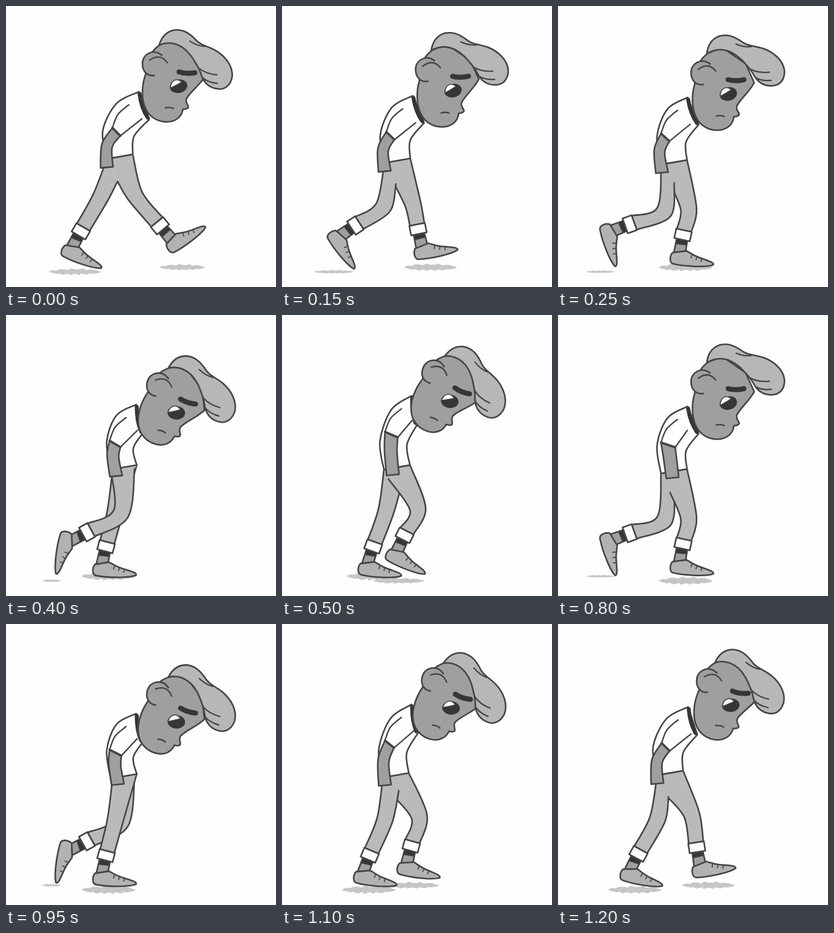
These frames come from a looping animation (477x498 px, 1.25 s). An HTML page:

```html
<!DOCTYPE html>
<html lang="en">
<head>
<meta charset="utf-8">
<title>Gloomy walk</title>
<style>
html, body { margin: 0; width: 100%; height: 100%; overflow: hidden; background: #fefefe; }
svg { display: block; width: 100vw; height: 100vh; }
path { stroke-linecap: round; stroke-linejoin: round; }
</style>
</head>
<body>
<svg id="stage" viewBox="0 0 477 498"></svg>
<script>
const LOOP = 1250, FRAME = 50, STEP = 550, FIRST = 700;
const INK = '#454545', DARK = '#363636', SKIN = '#9f9f9f', HAIR = '#b7b7b7',
      PANTS = '#bababa', SHOE = '#b2b2b2', SHADE = '#c6c6c6', WHITE = '#fefefe';

// Key poses of one leg, shared by both: phase (0 = heel strike), heel x y, foot pitch, knee x y
const LEG = [
  [0, 295, 437, -38, 228, 336],
  [.09, 202, 456, 2, 231, 360],
  [.227, 157, 461, 0, 193, 348],
  [.455, 112, 453, 9, 176, 345],
  [.5, 99, 442, 18, 167, 339],
  [.59, 74, 394, 68, 187, 365],
  [.727, 97, 386, 97, 203, 352],
  [.818, 184, 433, 21, 240, 344],
  [.955, 243, 449, -13, 236, 337]
];
// Upper body through one step: phase, collar x y, hip x y, ear x y, head tilt, hair lag
const BODY = [
  [0, 235, 152, 201, 267, 260, 102, 1, 0],
  [.18, 229, 162, 205, 277, 254, 118, -2, -8],
  [.45, 230, 159, 208, 270, 268, 123, 16, -5],
  [.64, 229, 143, 203, 270, 267, 100, 20, 0],
  [.91, 230, 147, 198, 264, 264, 100, 6, 2]
];

// Smooth cyclic interpolation, phase 0..1
function pose(keys, phase) {
  const n = keys.length;
  const row = i => keys[(i + n) % n];
  const at = i => row(i)[0] + Math.floor(i / n);
  let i = n - 1;
  while (keys[i][0] > phase) i--;
  const h = at(i + 1) - at(i), s = (phase - at(i)) / h;
  const [p, a, b, q] = [i - 1, i, i + 1, i + 2].map(row);
  return a.slice(1).map((v, j) => {
    const k = j + 1, d = b[k] - v;
    const ma = (b[k] - p[k]) / (at(i + 1) - at(i - 1)) * h;
    const mb = (q[k] - v) / (at(i + 2) - at(i)) * h;
    return v + s * (ma + s * (3 * d - 2 * ma - mb + s * (ma + mb - 2 * d)));
  });
}

const off = (p, x, y) => [p[0] + x, p[1] + y];
const along = (p, d, k) => [p[0] + d[0] * k, p[1] + d[1] * k];
const mix = (a, b, s) => [a[0] + (b[0] - a[0]) * s, a[1] + (b[1] - a[1]) * s];
const dir = (a, b) => {
  const len = Math.hypot(b[0] - a[0], b[1] - a[1]);
  return [(b[0] - a[0]) / len, (b[1] - a[1]) / len];
};
const polar = deg => [Math.cos(deg * Math.PI / 180), Math.sin(deg * Math.PI / 180)];
const ahead = d => [d[1], -d[0]];
const str = p => p[0].toFixed(1) + ' ' + p[1].toFixed(1);
const poly = pts => 'M' + pts.map(str).join('L');

// Smooth path through points
function curve(pts, closed, start = 'M') {
  const n = pts.length;
  const at = i => closed ? pts[(i + n) % n] : pts[Math.max(0, Math.min(n - 1, i))];
  let d = start + str(pts[0]);
  for (let i = 0; i < (closed ? n : n - 1); i++) {
    const a = at(i), b = at(i + 1), p = at(i - 1), q = at(i + 2);
    const c1 = off(a, (b[0] - p[0]) / 6, (b[1] - p[1]) / 6);
    const c2 = off(b, (a[0] - q[0]) / 6, (a[1] - q[1]) / 6);
    d += 'C' + [c1, c2, b].map(str).join(' ');
  }
  return closed ? d + 'Z' : d;
}
// Limb outline, open at its top: down the back, up the front
const limb = (back, front) => curve(back) + curve(front.reverse(), false, 'L');

const stage = document.getElementById('stage');
function add(tag, attrs, parent = stage) {
  const el = document.createElementNS('http://www.w3.org/2000/svg', tag);
  for (const k in attrs) el.setAttribute(k, attrs[k]);
  return parent.appendChild(el);
}
const shape = (fill, width = 2.8, parent = stage, d = '', stroke = INK) =>
  add('path', { d, fill, stroke: width ? stroke : 'none', 'stroke-width': width }, parent);
const draw = (el, d) => el.setAttribute('d', d);

const makeLeg = () => ({
  sock: shape(SKIN), band: shape(DARK, 1.5), foot: shape(SHOE), laces: shape('none', 1.8),
  pants: shape(PANTS), hem: shape(WHITE)
});
const shade = shape(SHADE, 0);
const far = makeLeg();
const pelvis = shape(PANTS, 0);
const near = makeLeg();
const shirt = shape(WHITE);
const arm = shape(SKIN);
const sleeve = shape(WHITE, 2.5);
const cuff = shape('none', 4);
const collar = shape('none', 7, stage, '', DARK);

// Head, drawn upright around the ear at 262 103
const head = add('g', {});
shape(SKIN, 2.8, head, 'M276 68C258 78 248 100 249 122C243 140 241 165 250 183C257 198 272 206 287 206' +
  'C303 206 314 197 316 183C322 183 327 181 325 177C322 172 320 168 322 164C330 150 345 140 354 124L340 90L300 60Z');
shape(SKIN, 0, head, 'M277 88C262 76 243 86 243 103C243 117 252 126 264 124L284 108Z');
shape('none', 2.8, head, 'M277 88C262 76 243 86 243 103C243 117 252 126 264 124');
shape('none', 2.5, head, 'M256 97Q274 84 287 101');
add('ellipse', { cx: 307.5, cy: 142.5, rx: 15.5, ry: 12, fill: DARK, transform: 'rotate(-12 307 142)' }, head);
shape(WHITE, 1.6, head, 'M293 146Q294 133 303 131Q309 131 313 135Q305 140 293 146Z');
shape('none', 9, head, 'M308 117Q321 121 336 118', DARK);
shape('none', 2.6, head, 'M285 181Q293 179 299 182');
const hair = add('g', {}, head);
shape(HAIR, 2.8, hair, 'M272 70C276 56 284 46 298 43C314 41 324 48 334 57C345 70 358 70 372 78' +
  'C388 87 403 104 402 123C400 138 391 146 380 146C368 146 358 141 351 130C347 122 346 116 342 109' +
  'C334 96 328 84 314 74C300 65 286 64 272 70Z');
shape('none', 2.4, hair, 'M343 110Q356 120 375 121M350 127Q360 135 376 136M326 62Q338 70 352 71');

// Returns the shoe's left and right end and its lift
function drawLeg(leg, phase, [left, right, crotch]) {
  const [hx, hy, pitch, kx, ky] = pose(LEG, phase);
  const heel = [hx, hy], knee = [kx, ky], sole = polar(pitch), up = ahead(sole);
  const at = (x, y) => along(along(heel, sole, x), up, y);
  const bez = (...p) => 'C' + p.map(q => str(at(...q))).join(' ');
  draw(leg.foot, 'M' + str(at(0, 19)) + bez([-5, 12], [-5, 0], [3, -1]) +
    bez([25, -5], [62, -5], [73, 0]) + bez([75, 5], [59, 8], [48, 12]) +
    bez([38, 15], [31, 20], [25, 23]) + 'Z');
  draw(leg.laces, [0, 1, 2].map(i =>
    poly([at(35 + 9 * i, 17 - 3 * i), at(33 + 9 * i, 11 - 3 * i)])).join(''));

  // trousers hang between the hip, the knee and a hem above the ankle
  const swing = Math.cos(2 * Math.PI * phase);
  const back = mix(left, crotch, Math.max(0, swing));
  const front = mix(right, crotch, Math.max(0, -swing));
  const ankle = at(12, 20), shin = dir(ankle, knee), hem = along(ankle, shin, 40);
  const kneeSide = ahead(dir(mix(back, front, .5), hem)), side = ahead(dir(knee, ankle));
  draw(leg.pants, limb(
    [back, along(knee, kneeSide, -14), along(hem, side, -13)],
    [front, along(knee, kneeSide, 14), along(hem, side, 13)]));
  const row = (k, w) => [-w, w].map(s => along(along(hem, shin, -k), side, s));
  const [a, b] = row(0, 14), [c, d] = row(17, 14);
  draw(leg.hem, poly([a, b, d, c]) + 'Z');
  const [e, f] = row(17, 9.5), g = at(2, 17), h = at(23, 20);
  draw(leg.sock, poly([e, g, h, f]) + 'Z');
  draw(leg.band, poly([e, mix(e, g, .35), mix(f, h, .35), f]) + 'Z');
  const toe = at(73, 0);
  return [Math.min(hx, toe[0]), Math.max(hx, toe[0]), 460 - hy];
}

// Ragged flat streak under a foot; thinner when the foot is up
function streak([l, r, lift], y) {
  const top = [], low = [], n = 14, half = Math.max(5, Math.min(15, 15 - lift / 6)) / 2;
  l -= 24;
  for (let i = 0; i <= n; i++) {
    const s = i / n, x = l + (r - l) * s, k = half * Math.sqrt(Math.sin(Math.PI * s) + 1e-6);
    top.push([x, y - k * (.8 + .25 * Math.sin(i * 2.3))]);
    low.unshift([x + 3 * Math.sin(i * 4), y + k * (.8 + .3 * Math.sin(i * 3.1 + 1))]);
  }
  return poly(top.concat(low)) + 'Z';
}

function drawTorso(neck, waist, throat, sway) {
  const [left, right] = waist;
  const ribs = off(left, -7, -50);
  draw(shirt, curve([neck, off(mix(neck, ribs, .4), -14, -7), ribs, left]) +
    curve([right, off(mix(right, throat, .45), -11, -4), throat], false, 'L') + 'Z');

  const shoulder = off(neck, -18, 23), s1 = off(neck, -47, 64);
  const s2 = off(s1, 20 - 6 * sway, 11 + 3 * sway), pit = off(s2, 29 + 9 * sway, -30);
  const wrist = off(mix(left, right, .5), -12 - 11 * sway, 15 + 4 * sway);
  const w1 = off(wrist, -11, 1), w2 = off(wrist, 11, -1);
  const elbow = (a, b) => off(mix(a, b, .5), -4 - 4 * sway, -7);
  draw(arm, limb([s1, elbow(s1, w1), w1], [s2, elbow(s2, w2), w2]));
  draw(sleeve, limb([shoulder, off(mix(shoulder, s1, .5), -5, -3), s1], [pit, s2]));
  draw(cuff, poly([s1, s2]));
  draw(collar, `M${str(off(neck, 1, 4))}Q${str(off(mix(neck, throat, .5), -5, 4))} ${str(off(throat, -3, -3))}`);
}

function render(t) {
  // the first step lingers on its heel strike
  const first = t < FIRST;
  const u = first ? Math.max(t / 1375, (t - FIRST + STEP) / STEP) : (t - FIRST) / STEP;
  const farPhase = (first ? 0 : .5) + u / 2;
  const sway = Math.cos(2 * Math.PI * farPhase);

  const [cx, cy, hx, hy, ex, ey, tilt, lag] = pose(BODY, u);
  const neck = [cx, cy], hip = [hx, hy];
  const waist = [off(hip, -23, 4), off(hip, 23, -4), off(hip, -4, 44)];
  const throat = along(neck, polar(69 + tilt / 2), 52);

  const farFoot = drawLeg(far, farPhase, waist);
  const nearFoot = drawLeg(near, (farPhase + .5) % 1, waist);
  draw(pelvis, poly(waist) + 'Z');
  draw(shade, streak(nearFoot, 471) + streak(farFoot, 463));
  drawTorso(neck, waist, throat, sway);
  head.setAttribute('transform', `translate(${ex} ${ey}) rotate(${tilt}) translate(-262 -103)`);
  hair.setAttribute('transform', `rotate(${lag} 272 70)`);
}

function tick(now) {
  render(Math.floor(now % LOOP / FRAME) * FRAME);
  requestAnimationFrame(tick);
}
render(0);
requestAnimationFrame(tick);
</script>
</body>
</html>
```
